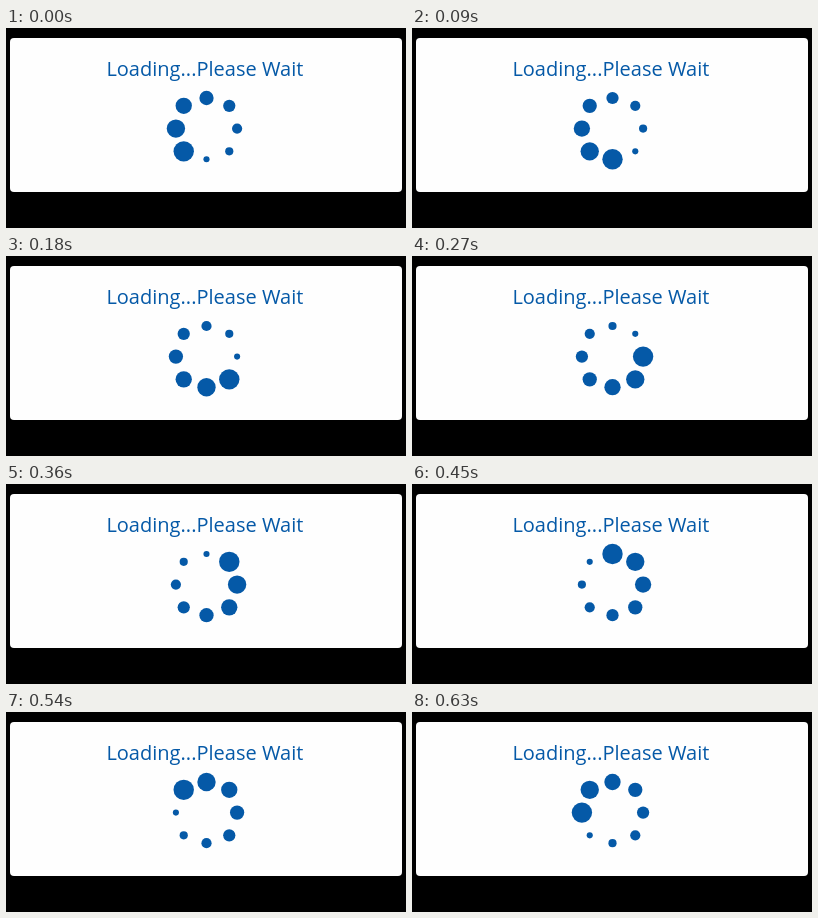
An HTML page with a canvas for the animation above (0.72 s loop, 400 by 200 pixels).

```html
<!DOCTYPE html>
<html lang="en">
<head>
<meta charset="utf-8">
<title>Loading</title>
<style>
  html, body { margin: 0; width: 100%; height: 100%; overflow: hidden; background: #000; }
  canvas { display: block; }
</style>
</head>
<body>
<canvas id="stage" width="400" height="200"></canvas>
<script>
const ctx = document.getElementById('stage').getContext('2d');
const BLUE = '#0559a7';
const DOTS = 8, STEP = 90;
const CENTER = { x: 200.5, y: 100.6 };
const START = 3; // head begins at lower left, counted clockwise from the right

function drawPanel() {
  ctx.fillStyle = '#000';
  ctx.fillRect(0, 0, 400, 200);
  ctx.fillStyle = '#fefefe';
  ctx.beginPath();
  ctx.roundRect(4, 10, 392, 154, 4);
  ctx.fill();
}

function drawLabel() {
  ctx.fillStyle = BLUE;
  ctx.font = '20px "Open Sans", sans-serif';
  ctx.fillText('Loading...Please Wait', 100.4, 48);
}

// The head steps counterclockwise; dots shrink clockwise behind it.
function drawSpinner(step) {
  ctx.fillStyle = BLUE;
  for (let i = 0; i < DOTS; i++) {
    const slot = START - step + i;
    const angle = slot * 2 * Math.PI / DOTS;
    const orbit = slot % 2 ? 32.2 : 30.6;
    ctx.beginPath();
    ctx.arc(CENTER.x + orbit * Math.cos(angle), CENTER.y + orbit * Math.sin(angle),
            10.2 - i * 1.02, 0, 2 * Math.PI);
    ctx.fill();
  }
}

function render(now) {
  drawPanel();
  drawLabel();
  drawSpinner(Math.floor(now / STEP) % DOTS);
}

function tick() {
  render(performance.now());
  requestAnimationFrame(tick);
}
tick();
</script>
</body>
</html>
```
